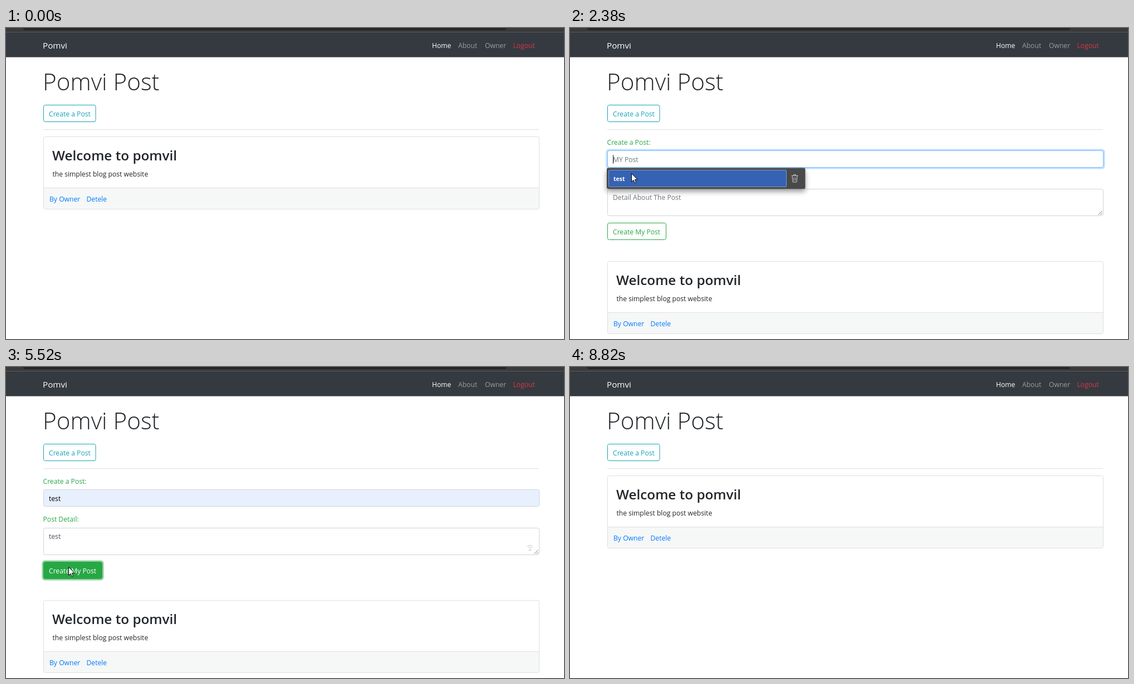
These frames come from a looping animation (1002x559 px, 9200 ms). An HTML page:

```html
<!DOCTYPE html>
<html lang="en">
<head>
<meta charset="utf-8">
<title>Blog post demo</title>
<style>
  html, body { margin: 0; width: 100%; height: 100%; overflow: hidden; background: #fff; }
  svg { display: block; font: 12.15px "Open Sans", "Noto Sans", sans-serif; fill: #212529; }
  .brand { font-size: 15.2px; fill: #fff; }
  .display { font-size: 42.2px; font-weight: 300; }
  .heading { font-size: 24.3px; font-weight: 600; }
  .muted { fill: #9a9da0; }
  .link { fill: #007bff; }
  .label { fill: #28a745; }
  .hint { fill: #6c757d; }
  .white { fill: #fff; }
  .line { fill: none; stroke: #dfdfdf; }
  .field { fill: #fff; stroke: #ced4da; }
  .focus { fill: none; stroke: #80bdff; }
  .halo { fill: none; stroke-width: 2.6; }
  .pointer { fill: #fff; stroke: #000; stroke-linejoin: round; }
</style>
</head>
<body>
<svg width="1002" height="559" viewBox="0 0 1002 559">
  <defs>
    <clipPath id="fold"><rect id="foldBox" y="195" width="1002" height="0"/></clipPath>
    <filter id="shadow" x="-10%" y="-30%" width="120%" height="200%">
      <feDropShadow dx="0" dy="5" stdDeviation="5" flood-opacity=".4"/>
    </filter>
  </defs>

  <rect width="1002" height="8" fill="#3b3a3a"/>
  <rect x="31" y="-4" width="867" height="8" rx="3" fill="#272626"/>
  <rect y="7" width="1002" height="1" fill="#5a5b5c"/>
  <rect y="8" width="1002" height="44.5" fill="#343a40"/>
  <text class="brand" x="66" y="36.5">Pomvi</text>
  <text class="white" x="765" y="36">Home</text>
  <text class="muted" x="812" y="36">About</text>
  <text class="muted" x="860" y="36">Owner</text>
  <text x="910.5" y="36" fill="#dc3545">Logout</text>

  <text class="display" x="66" y="111.5">Pomvi Post</text>
  <g id="create"></g>
  <path class="line" d="M67 182.5H957"/>

  <g id="form" clip-path="url(#fold)">
    <text class="label" x="66.5" y="210">Create a Post:</text>
    <rect id="titleField" class="field" x="67.5" y="220.5" width="890" height="30" rx="3"/>
    <g id="titleFocus">
      <rect class="halo" x="65.7" y="218.7" width="893.6" height="33.6" rx="4.5" stroke="#bfdeff"/>
      <rect class="focus" x="67.5" y="220.5" width="890" height="30" rx="3"/>
    </g>
    <text id="titleText" x="77" y="241"></text>
    <path id="titleCaret" d="M77.5 228V244" stroke="#222"/>

    <text class="label" x="66.5" y="278">Post Detail:</text>
    <rect class="field" x="67.5" y="289.5" width="890" height="48" rx="3"/>
    <g id="detailFocus">
      <rect class="halo" x="65.7" y="287.7" width="893.6" height="51.6" rx="4.5" stroke="#bfdeff"/>
      <rect class="focus" x="67.5" y="289.5" width="890" height="48" rx="3"/>
    </g>
    <path d="M948.5 336L955.5 329M952.5 336L955.5 333" stroke="#777" fill="none"/>
    <text id="detailText" x="77" y="309"></text>
    <path id="detailCaret" d="M.5 296V312" stroke="#222"/>
    <path id="badge" d="M936 323Q941 318 946 323M938 325Q941 322 944 325M939 327L943 331M943 327L939 331"
      fill="none" stroke="#c4c4c4"/>
    <g id="submit"></g>
  </g>

  <g id="newPost"></g>
  <g id="firstPost"></g>

  <g id="suggest">
    <rect x="66" y="251.5" width="356.5" height="37.5" rx="2.5" fill="#4a4a4a" filter="url(#shadow)"/>
    <rect x="69.5" y="255.5" width="319" height="30" rx="1.5" fill="#3562b2" stroke="#7f9ccf"/>
    <text class="white" x="78" y="275" font-size="10.5" font-weight="700">test</text>
    <path d="M397.5 265.5H409.5M401.5 265V263.5H405.5V265M399 266L400 277H407L408 266M402 268.500V274.500M405 268.500V274.500"
      fill="none" stroke="#c8c8c8"/>
  </g>

  <g id="cursor">
    <path id="arrow" class="pointer" d="M.5 .5V15.500L4 12.300L6.300 17.500L8.600 16.500L6.400 11.300H11Z"/>
    <path id="hand" class="pointer" d="M-1.500 12V1.800a1.500 1.500 0 0 1 3 0V6.500q2-.8 2.700.700q1.700-.5 2.200.800q1.800-.2 1.800 1.500V14L6.500 18V20.500H-1.500V18.500L-5 13.500Q-6.500 10.500-4 10.500Z"/>
    <path id="beam" fill="none" stroke="#111" d="M-3.500-7.500H-1L0-6.500L1-7.500H3.500M0-6.500V6.500M-3.500 7.500H-1L0 6.500L1 7.500H3.500"/>
  </g>
</svg>

<script>
const LOOP = 9200;
const OPEN = 1365, POSTED = 5670, DELETED = 8190;
const $ = id => document.getElementById(id);

function button(id, x, y, width, label, color, halo) {
  const box = `x="${x}" y="${y}" width="${width}" height="30" rx="3"`;
  const text = `x="77" y="${y + 20.5}"`;
  $(id).innerHTML = `
    <rect id="${id}Halo" class="halo" x="${x - 1.8}" y="${y - 1.8}" width="${width + 3.6}" height="33.6" rx="4.5" stroke="${halo}"/>
    <rect ${box} fill="#fff" stroke="${color}"/><text ${text} fill="${color}">${label}</text>
    <g id="${id}Hover"><rect ${box} fill="${color}" stroke="${color}"/><text class="white" ${text}>${label}</text></g>`;
}

function post(id, title, body) {
  $(id).innerHTML = `
    <rect x="67.5" y=".5" width="890" height="130" rx="3" fill="#fff"/>
    <rect x="68" y="92" width="889" height="38" fill="#f6f7f7"/>
    <path class="line" d="M68 92.500H957"/>
    <rect class="line" x="67.5" y=".5" width="890" height="130" rx="3"/>
    <text class="heading" x="83" y="43">${title}</text>
    <text x="83.500" y="72">${body}</text>
    <text class="link" x="78" y="117">By Owner</text>
    <text class="link remove" x="144.500" y="117">Detele</text>`;
}

button("create", 67.5, 138.5, 93.5, "Create a Post", "#17a2b8", "#8bd0db");
button("submit", 67.5, 350.5, 105, "Create My Post", "#28a745", "#94d3a2");
post("newPost", "test", "test");
post("firstPost", "Welcome to pomvil", "the simplest blog post website");
const removeLink = document.querySelector("#newPost .remove");

// time, x, y, shape until the next key
const track = [
  [290, 100, 134, "arrow"], [360, 143, 96, "beam"], [510, 143, 96, "beam"],
  [590, 122, 145, "hand"], [980, 117, 166, "hand"], [1530, 117, 166, "hand"],
  [1600, 116, 181, "arrow"], [1680, 116, 181, "arrow"], [1840, 112, 236, "beam"],
  [2230, 111, 240, "beam"], [2300, 110, 255, "arrow"], [2370, 110, 261, "arrow"],
  [2860, 110, 261, "arrow"], [3000, 112, 304, "beam"], [3870, 112, 304, ""],
  [4740, 112, 318, "beam"], [4820, 115, 352, "hand"], [4880, 115, 355, "hand"],
  [5100, 114, 358, "hand"], [5520, 112, 359, "arrow"], [5670, 112, 359, "arrow"],
  [5970, 133, 215, "arrow"], [6150, 133, 215, "arrow"], [6220, 133, 195, "arrow"],
  [6400, 133, 195, "arrow"], [6850, 166, 302, "hand"], [7010, 167, 308, "hand"],
  [7310, 167, 308, "arrow"], [8190, 167, 308, "arrow"], [8560, 974, 552, "arrow"],
  [8820, 974, 552, ""], [LOOP, 974, 552, ""]
];
const keyTimes = [3870, 3950, 4100, 4180];

// The CSS "ease" curve, solved by bisection
function ease(p) {
  if (p <= 0) return 0;
  if (p >= 1) return 1;
  let low = 0, high = 1, s;
  for (let i = 0; i < 20; i++) {
    s = (low + high) / 2;
    if (.75 * s * (1 - s) + s ** 3 < p) low = s; else high = s;
  }
  return .3 * s * (1 - s) ** 2 + 3 * s * s * (1 - s) + s ** 3;
}

const between = (t, from, to) => t >= from && t < to;
const fade = (t, on, off) => ease((t - on) / 150) - ease((t - off) / 150);
const show = (id, visible) => { $(id).style.display = visible ? "" : "none"; };
const opacity = (id, value) => $(id).setAttribute("opacity", value);
const move = (id, x, y) => $(id).setAttribute("transform", `translate(${x} ${y})`);

function write(id, text, hint, color) {
  $(id).textContent = text || hint;
  $(id).style.fill = text ? color : "#6c757d";
}

function drawCursor(t) {
  const next = track.findIndex(key => key[0] > t);
  show("cursor", next > 0);
  if (next < 1) return;
  const [t0, x0, y0, shape] = track[next - 1], [t1, x1, y1] = track[next];
  const p = (t - t0) / (t1 - t0);
  move("cursor", x0 + (x1 - x0) * p, y0 + (y1 - y0) * p);
  for (const id of ["arrow", "hand", "beam"]) show(id, id === shape);
}

function drawForm(t) {
  const height = 185.6 * ease((t - OPEN) / 350);
  show("form", between(t, OPEN, POSTED));
  $("foldBox").setAttribute("height", height > 185 ? 200 : height);

  const filled = t >= 2680;
  write("titleText", filled ? "test" : "", "MY Post", "#000");
  $("titleField").style.fill = filled ? "#e8f0fe" : "#fff";
  show("titleCaret", between(t, 2090, 2680));
  show("suggest", between(t, 2300, 2680));

  const typed = "test".slice(0, keyTimes.filter(k => t >= k).length);
  write("detailText", typed, "Detail About The Post", "#495057");
  show("detailCaret", between(t, 3170, 3650) || between(t, 3870, 4740));
  move("detailCaret", 77 + (typed && t < POSTED ? $("detailText").getComputedTextLength() : 0), 0);
  show("badge", t >= 4740);

  opacity("titleFocus", fade(t, 2090, 3170));
  opacity("detailFocus", fade(t, 3170, 5220));
  opacity("submitHover", fade(t, 4868, POSTED));
  opacity("submitHalo", fade(t, 5220, POSTED));
  return height;
}

function draw(t) {
  opacity("createHover", fade(t, 580, 1620));
  opacity("createHalo", fade(t, 1320, 2090));
  const height = drawForm(t);

  let top = 195;
  if (between(t, OPEN, POSTED)) top += 38.4 + height;
  if (between(t, POSTED, DELETED)) top = 346;
  move("firstPost", 0, Math.round(top));
  move("newPost", 0, 195);
  show("newPost", between(t, POSTED, DELETED));

  const hovered = between(t, 6850, DELETED);
  removeLink.style.fill = hovered ? "#0056b3" : "";
  removeLink.style.textDecoration = hovered ? "underline" : "";
  drawCursor(t);
}

const start = performance.now();
(function tick() {
  draw((performance.now() - start) % LOOP);
  requestAnimationFrame(tick);
})();
</script>
</body>
</html>
```
